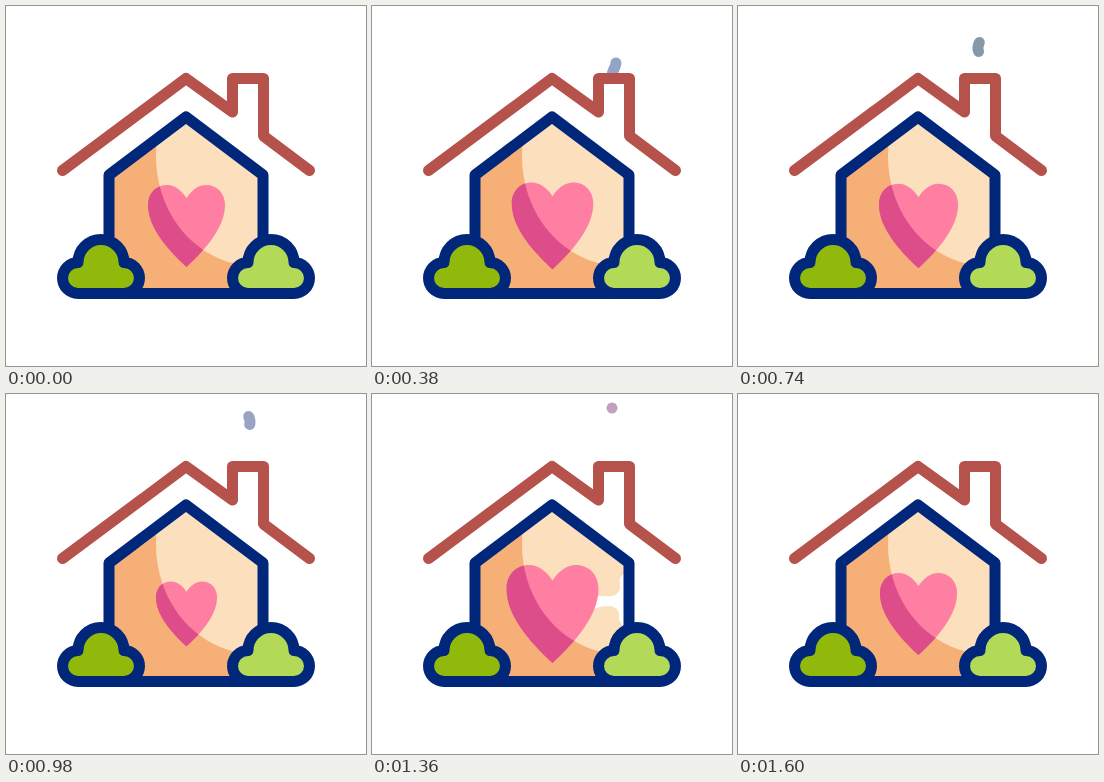
An HTML page that plays this animation: 360x360 px, repeating every 1620 ms.

```html
<!DOCTYPE html>
<html lang="en">
<head>
<meta charset="utf-8">
<title>Home with a beating heart</title>
<style>
  html, body { margin: 0; width: 100%; height: 100%; overflow: hidden; background: #fff; }
  svg { display: block; width: 100vw; height: 100vh; }
  .line { fill: none; stroke-width: 11; stroke-linecap: round; stroke-linejoin: round; }
  .navy { stroke: #00277a; }
</style>
</head>
<body>
<svg viewBox="0 0 360 360">
  <defs>
    <path id="shade" d="M95 100H154Q150 126 150 150C150 205 185 248 230 258V290H95Z"/>
    <path id="wall" d="M103 169L180 111L257 169V287.5H103Z"/>
    <path id="bush" d="M72 287.5a15.5 15.5 0 0 1 0-31a23 23 0 0 1 46 0a15.5 15.5 0 0 1 0 31z"/>
    <clipPath id="inWall"><use href="#wall"/></clipPath>
    <clipPath id="inHeart"><path id="heartClip"/></clipPath>
  </defs>
  <rect width="360" height="360" fill="#fff"/>
  <path id="smoke" class="line"/>
  <path class="line" stroke="#b5524b" d="M56.5 164.5L180 72.5L226.5 106V72.5H257.5V130L303.5 164.5"/>
  <use href="#wall" fill="#fcdfbd"/>
  <use href="#shade" fill="#f6b077" clip-path="url(#inWall)"/>
  <g id="gap" fill="#fff">
    <path d="M252 180Q247 182 248 190Q249 200 244 204Q239 207 244 210Q250 214 249 222Q248 230 252 234Z"/>
    <circle cx="229" cy="207" r="3.5"/>
    <path id="wideGap" d="M222 201Q230 203 240 202Q249 200 248 190L252 182V232L247 226Q249 213 237 212Q228 212 222 215Z"/>
  </g>
  <path id="heart" fill="#ff7fa3"/>
  <use href="#shade" fill="#dc4d8a" clip-path="url(#inHeart)"/>
  <use href="#wall" class="line navy"/>
  <use href="#bush" class="line navy" style="fill:#91b90b"/>
  <use href="#bush" class="line navy" style="fill:#b3da57" x="170"/>
</svg>
<script>
const LOOP = 1620, BEAT = LOOP / 2;
const $ = id => document.getElementById(id);

const head = [[140, 70], [200, 66.5], [540, 48.5], [740, 36.5], [980, 22.5], [1080, 18.5], [1180, 14]];
const tail = [[340, 70], [540, 57.5], [740, 45.5], [980, 30.5], [1300, 14]];
const tint = [[200, 156, 158, 166], [540, 143, 169, 227], [740, 133, 153, 169],
  [980, 154, 163, 196], [1360, 195, 160, 192]];
const pulse = [[0, 1], [188, 0.79], [510, 1.205], [BEAT, 1]];

const linear = u => u;
const smooth = u => u * u * (3 - 2 * u);

function track(keys, t, ease = linear, col = 1) {
  if (t <= keys[0][0]) return keys[0][col];
  for (let i = 1; i < keys.length; i++) {
    const a = keys[i - 1], b = keys[i];
    if (t <= b[0]) return a[col] + (b[col] - a[col]) * ease((t - a[0]) / (b[0] - a[0]));
  }
  return keys[keys.length - 1][col];
}

function heartPath(s) {
  const p = (x, y) => (180.5 + x * s).toFixed(2) + ' ' + (220 + y * s).toFixed(2) + ' ';
  const half = k => 'M' + p(0, -28) +
    'C' + p(5.5 * k, -36.5) + p(12.5 * k, -41) + p(19.5 * k, -41) +
    'C' + p(30.5 * k, -41) + p(38.5 * k, -33) + p(38.5 * k, -21) +
    'C' + p(38.5 * k, 1) + p(19.5 * k, 23) + p(0, 41) + 'Z';
  return half(1) + half(-1);
}

// The smoke climbs a gentle wave above the chimney.
const sway = y => 242 - 2 * Math.cos(2 * Math.PI * (y - 42) / 28);

function smokePath(top, bottom) {
  let d = '';
  for (let i = 0; i <= 8; i++) {
    const y = bottom + (top - bottom) * i / 8;
    d += (i ? 'L' : 'M') + sway(y).toFixed(2) + ' ' + y.toFixed(2);
  }
  return d;
}

function draw(t) {
  const beat = t % BEAT;
  const size = track(pulse, beat, smooth);
  const d = heartPath(size);
  $('heart').setAttribute('d', d);
  $('heartClip').setAttribute('d', d);
  $('gap').style.display = size > 1.17 && beat > 480 ? '' : 'none';
  $('wideGap').style.display = t > BEAT ? '' : 'none';

  const smoke = $('smoke');
  smoke.style.display = t > 140 && t < 1420 ? '' : 'none';
  smoke.setAttribute('d', smokePath(track(head, t), track(tail, t) + 0.01));
  const rgb = [1, 2, 3].map(c => Math.round(track(tint, t, linear, c)));
  smoke.setAttribute('stroke', `rgb(${rgb})`);
}

const start = performance.now();
function tick() {
  draw((performance.now() - start) % LOOP);
  requestAnimationFrame(tick);
}
tick();
</script>
</body>
</html>
```
